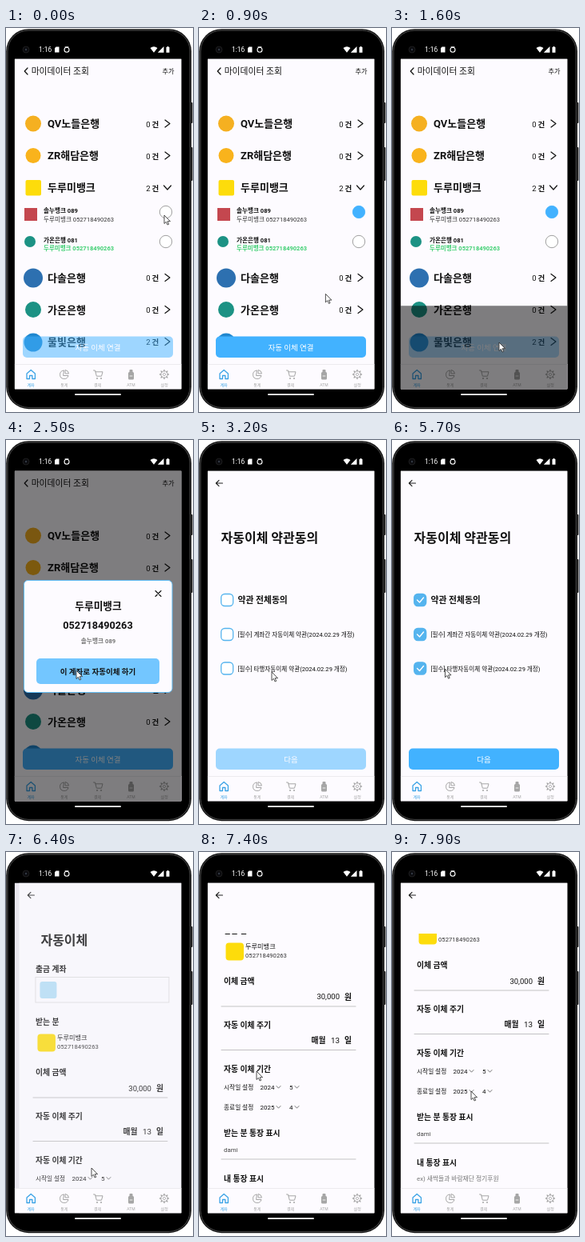
An HTML page for the animation above (8000 ms loop, 234x480 px).

```html
<!DOCTYPE html>
<html lang="ko">
<head>
<meta charset="utf-8">
<title>자동이체</title>
<style>
html, body { margin: 0; width: 100%; height: 100%; overflow: hidden; background: #fff; }
svg { display: block; width: 100vw; height: 100vh; }
text { font-family: Roboto, "Noto Sans CJK KR", "Noto Sans CJK", sans-serif; white-space: pre; }
.line { fill: none; stroke-linecap: round; stroke-linejoin: round; }
</style>
</head>
<body>
<svg id="stage" viewBox="0 0 234 480"></svg>
<script>
const LOOP = 8000, BLUE = '#42b2ff', SKY = '#73c6ff', INK = '#111', PAPER = '#fdfbff';
const ACCOUNT = '052718490263', BANK = '두루미뱅크';

// Markup helpers; text is placed by its vertical centre.
const text = (x, y, size, str, { bold, fill = INK, anchor = 'start' } = {}) =>
  `<text x="${x}" y="${y + size * .37}" font-size="${size}" font-weight="${bold ? 700 : 400}" fill="${fill}" text-anchor="${anchor}">${str}</text>`;
const rect = (x, y, w, h, fill, r = 0, extra = '') =>
  `<rect x="${x}" y="${y}" width="${w}" height="${h}" rx="${r}" fill="${fill}" ${extra}/>`;
const dot = (x, y, r, fill, extra = '') => `<circle cx="${x}" cy="${y}" r="${r}" fill="${fill}" ${extra}/>`;
const line = (d, color = INK, w = 1, extra = '') =>
  `<path class="line" d="${d}" stroke="${color}" stroke-width="${w}" ${extra}/>`;
const group = (id, body, extra = '') => `<g id="${id}" ${extra}>${body}</g>`;
const bold = { bold: 1 };
const mid = { anchor: 'middle' };

const bigButton = (id, label) => group(id,
  rect(21, 385.5, 188, 26.5, BLUE, 5) + text(115, 399, 9.5, label, { ...mid, fill: '#fff' }));
const backArrow = line('M29.5 54H21.5M25 50.3L21.3 54L25 57.7', '#222', 1.1);

function bankRow(y, name, count, icon, open) {
  const chevron = open ? `M197.5 ${y - 2.5}l4.5 5 4.5-5` : `M199 ${y - 4.5}l6 4.5-6 4.5`;
  return icon + text(52, y, 13, name, bold) +
    text(180.5, y + .5, 9.5, count, { anchor: 'end' }) + text(182.5, y + .5, 9.5, '건', bold) +
    line(chevron, INK, 1.2);
}

const ring = 'stroke="#888" stroke-width=".8"';
const listPage =
  line('M27 50l-3.8 4 3.8 4', INK, 1.2) + text(31.7, 54.5, 10.8, '마이데이터 조회') +
  text(195.5, 54, 8.2, '추가') +
  bankRow(119.5, 'QV노들은행', 0, dot(34, 119.5, 10, '#f5b021')) +
  bankRow(159.5, 'ZR해담은행', 0, dot(34, 159.5, 9.5, '#f9b31c')) +
  bankRow(199.5, BANK, 2, rect(24.5, 190, 19.5, 19.5, '#fddc0b', 2), true) +
  rect(23, 225, 16, 16, '#c4474f') +
  text(47, 228, 7.6, '솔누뱅크 089', bold) + text(47, 239, 7.6, `${BANK} ${ACCOUNT}`, { fill: '#333' }) +
  dot(30, 267, 7, '#1c9284') +
  text(47, 265, 7.6, '가온은행 081', bold) + text(47, 275, 7.5, `${BANK} ${ACCOUNT}`, { bold: 1, fill: '#3ecf72' }) +
  dot(200, 230, 7.7, '#fff', ring + ' id="pick"') + dot(200, 267, 7.7, '#fff', ring) +
  bankRow(312, '다솔은행', 0, dot(34, 312.5, 12, '#2d70b0')) +
  bankRow(352, '가온은행', 0, dot(34, 352, 10, '#1c9284')) +
  bankRow(392, '물빛은행', 2, dot(34, 393, 11.5, '#2087cf')) +
  bigButton('linkButton', '자동 이체 연결');

const checkRow = (y, label, size, opt) =>
  rect(27.7, y - 7.5, 15, 15, '#fff', 4.5, 'class="box" stroke="#55b4ee" stroke-width="1.3"') +
  line(`M31.5 ${y}l3 3 5-6`, '#fff', 1.4, 'class="tick"') + text(48.5, y + .5, size, label, opt);
const termsPage = backArrow +
  text(27.5, 122.5, 16, '자동이체 약관동의', bold) +
  checkRow(200, '약관 전체동의', 10.8, bold) +
  checkRow(243, '[필수] 계좌간 자동이체 약관(2024.02.29 개정)', 7.6) +
  checkRow(285.5, '[필수] 타행자동이체 약관(2024.02.29 개정)', 7.6) +
  bigButton('nextButton', '다음');

const heading = (y, str) => text(31, y, 9.8, str, bold);
const rule = y => line(`M28 ${y}H196`, '#aaa', .7);
const dateRow = (y, label, year, month) => {
  const arrow = x => line(`M${x} ${y - 1.5}l2.5 2.7 2.5-2.7`, '#555', .8);
  return text(31, y, 7.7, label) + text(76.5, y, 8, year) + arrow(97) + text(113, y, 8, month) + arrow(120);
};
const formBody =
  text(37.5, 110.5, 16, '자동이체', bold) +
  heading(146, '출금 계좌') +
  rect(31, 156.5, 167, 31.5, PAPER, 0, 'stroke="#ddd" stroke-width=".9"') + rect(36.5, 162, 21, 21, '#b4def7', 3) +
  heading(212, '받는 분') + rect(33.5, 227.5, 22.5, 22, '#fddc0b', 4) +
  text(58, 232, 8.2, BANK) + text(58, 243.5, 7.7, ACCOUNT, { fill: '#333' }) +
  heading(275.5, '이체 금액') +
  text(176, 295, 9.5, '30,000', { anchor: 'end' }) + text(182, 295, 9.8, '원', bold) + rule(307) +
  heading(330, '자동 이체 주기') +
  text(140.5, 349.5, 9.8, '매월', bold) + text(165, 349.5, 9.8, '13') + text(182, 349.5, 9.8, '일', bold) + rule(361.5) +
  heading(385, '자동 이체 기간') +
  dateRow(408, '시작일 설정', 2024, 5) + dateRow(433, '종료일 설정', 2025, 4) +
  heading(465.5, '받는 분 통장 표시') + text(31, 486, 7.8, 'dami', { fill: '#444' }) + rule(498) +
  heading(522, '내 통장 표시') + text(31, 542.5, 7.8, 'ex) 새싹들과 바람재단 정기후원', { fill: '#777' }) + rule(555);
const formPage = backArrow + `<g clip-path="url(#formClip)">${group('scroller', formBody)}</g>`;

const GREY = '#a6a6a6', HOME = '#3ba3e6';
const teeth = [...Array(8)].map((_, i) => {
  const c = Math.cos(i * Math.PI / 4), s = Math.sin(i * Math.PI / 4);
  return `M${198 + 4.2 * c} ${433 + 4.2 * s}L${198 + 5.5 * c} ${433 + 5.5 * s}`;
}).join('');
const tabs = rect(10.5, 420, 210, 32, PAPER) + line('M10.5 420.5H220', '#e6e6e8', .7) +
  line('M26 432l5.2-4.5 5.2 4.5v6.5h-3.5v-4h-3.4v4H26z', HOME, 1.3) +
  line('M72 428a5.3 5.3 0 1 0 6 6.5h-6zM74.5 427.5a5 5 0 0 1 4 4.5h-4z', GREY) +
  line('M109.5 428h2l1.8 7.2h6.2l1.5-5.4h-9', GREY) + dot(114, 438, 1, GREY) + dot(119, 438, 1, GREY) +
  rect(154.5, 427, 4, 4, GREY, 1) + rect(153, 430, 7, 9.5, GREY, 1.5) + line('M155 435h3', '#fff', .8) +
  dot(198, 433, 4.2, 'none', `stroke="${GREY}"`) + dot(198, 433, 1.6, 'none', `stroke="${GREY}" stroke-width=".8"`) + line(teeth, GREY, 1.4) +
  ['계좌', '통계', '결제', 'ATM', '설정'].map((s, i) =>
    text(31 + i * 41.8, 446, 5, s, { ...mid, fill: i ? GREY : HOME })).join('');

const modal = rect(10.5, 38, 210, 420, 'rgba(0,0,0,.5)') +
  rect(22.5, 175.5, 185.5, 140, PAPER, 5, 'stroke="#62bdf5"') +
  line('M187 188.5l7 7M194 188.5l-7 7', INK, 1.1) +
  text(115.5, 207.5, 12.7, BANK, { ...mid, ...bold }) +
  text(115, 231.5, 12.7, ACCOUNT, { ...mid, ...bold }) +
  text(115.5, 251.5, 7.7, '솔누뱅크 089', { ...mid, ...bold, fill: '#777' }) +
  group('payButton', rect(38, 273, 154, 32, SKY, 5) + text(115, 289, 9.5, '이 계좌로 자동이체 하기', { ...mid, ...bold }));

const phone = rect(230, 93, 3.5, 26, '#222', 1) + rect(230, 149, 3.5, 42, '#222', 1) +
  rect(.2, 1.2, 231.8, 475, '#151515', 28) +
  rect(2, 3, 228.2, 471.4, '#000', 26, 'stroke="#484848" stroke-width="1"') +
  dot(25, 27, 4, '#0b0b0e', 'stroke="#222" stroke-width=".8"') + dot(25, 27, 1.2, '#333a44') +
  text(41, 27, 8.4, '1:16', { fill: '#fff' }) +
  `<path fill="#fff" d="M62.5 23.5h4v7h-5.5v-5.3zM180.5 25q4.5-3.6 9 0l-4.5 5.7zM197.5 23v7.7h-7.7zM200.5 24h1v-1h2v1h1v6.7h-4z"/>` +
  dot(76, 27.2, 3, 'none', 'stroke="#fff" stroke-width="1.1"') + line('M74 23.8h4', '#fff', 1) +
  rect(86, 457.2, 58, 1.8, '#fff', .9);

const stage = document.getElementById('stage');
stage.innerHTML = `<defs>
  <clipPath id="screenClip"><rect x="10.9" y="38.8" width="208.4" height="412.4"/></clipPath>
  <clipPath id="formClip"><rect x="10.5" y="102" width="209.5" height="318"/></clipPath></defs>` +
  phone + `<g clip-path="url(#screenClip)">` + rect(10, 38, 211, 415, '#e8e6ee') +
  [['list', listPage], ['terms', termsPage], ['form', formPage]].map(([id, body]) =>
    group(id, rect(10.5, 38, 210, 415, PAPER) + body)).join('') +
  tabs + group('modal', modal) + '</g>' +
  group('cursor', '<path d="M0 0V10.5L2.4 8.3 4.1 12 5.7 11.3 4.1 7.7H7.5Z" fill="#fff" stroke="#222" stroke-width=".8"/>');

const el = id => document.getElementById(id);
const boxes = [...document.querySelectorAll('.box')], ticks = [...document.querySelectorAll('.tick')];
const clamp = v => Math.max(0, Math.min(1, v));
const smooth = (t, a, b) => { const p = clamp((t - a) / (b - a)); return p * p * (3 - 2 * p); };
const dip = (t, a, b, depth) => 1 - depth * smooth(t, a, a + 100) * (1 - smooth(t, b - 100, b));

// Pointer stops: time, x, y
const path = [
  [0, 198, 234], [350, 198, 234], [1300, 134, 393], [1850, 134, 393], [2400, 88, 288],
  [2800, 88, 288], [3100, 91, 290], [4300, 91, 290], [4900, 53, 200], [5100, 34, 199],
  [5400, 34, 199], [6050, 107, 395], [6600, 107, 395], [7100, 73, 281], [7200, 72, 274],
  [7400, 72, 274], [7850, 99, 299], [LOOP, 99, 299]
];
function pointer(t) {
  const i = path.findIndex(p => p[0] > t), [a, x, y] = path[i - 1], [b, u, v] = path[i];
  const k = smooth(t, a, b);
  return [x + (u - x) * k, y + (v - y) * k];
}

const show = (id, on) => el(id).setAttribute('display', on ? 'inline' : 'none');
const move = (id, x, y) => el(id).setAttribute('transform', `translate(${x} ${y})`);
const fade = (id, v) => el(id).setAttribute('opacity', v);

function enter(id, t, start) {
  const left = (1 - clamp((t - start) / 250)) ** 3;
  move(id, 28 * left, 0);
  fade(id, 1 - left);
}

function draw(t) {
  show('list', t < 2900);
  show('terms', t >= 2900 && t < 6300);
  show('form', t >= 6300);
  enter('terms', t, 2900);
  enter('form', t, 6300);

  const picked = t >= 200;
  el('pick').setAttribute('fill', picked ? BLUE : '#fff');
  el('pick').setAttribute('stroke', picked ? BLUE : '#888');
  fade('linkButton', (.5 + .5 * smooth(t, 200, 300)) * dip(t, 1400, 1800, .6));

  show('modal', t > 1500 && t < 3000);
  move('modal', 0, 420 * (1 - smooth(t, 1500, 1800) + smooth(t, 2800, 3000)));
  fade('payButton', dip(t, 2600, 2850, .6));

  const agreed = t >= 5400;
  boxes.forEach(b => b.setAttribute('fill', agreed ? '#55b4ee' : '#fff'));
  ticks.forEach(k => k.setAttribute('display', agreed ? 'inline' : 'none'));
  fade('nextButton', (agreed ? 1 : .5) * dip(t, 6120, 6400, .5));

  move('scroller', 0, -114 * smooth(t, 6600, 7100) - 20 * smooth(t, 7400, 7800));
  move('cursor', ...pointer(t));
}

function tick() {
  draw(performance.now() % LOOP);
  requestAnimationFrame(tick);
}
tick();
</script>
</body>
</html>
```
